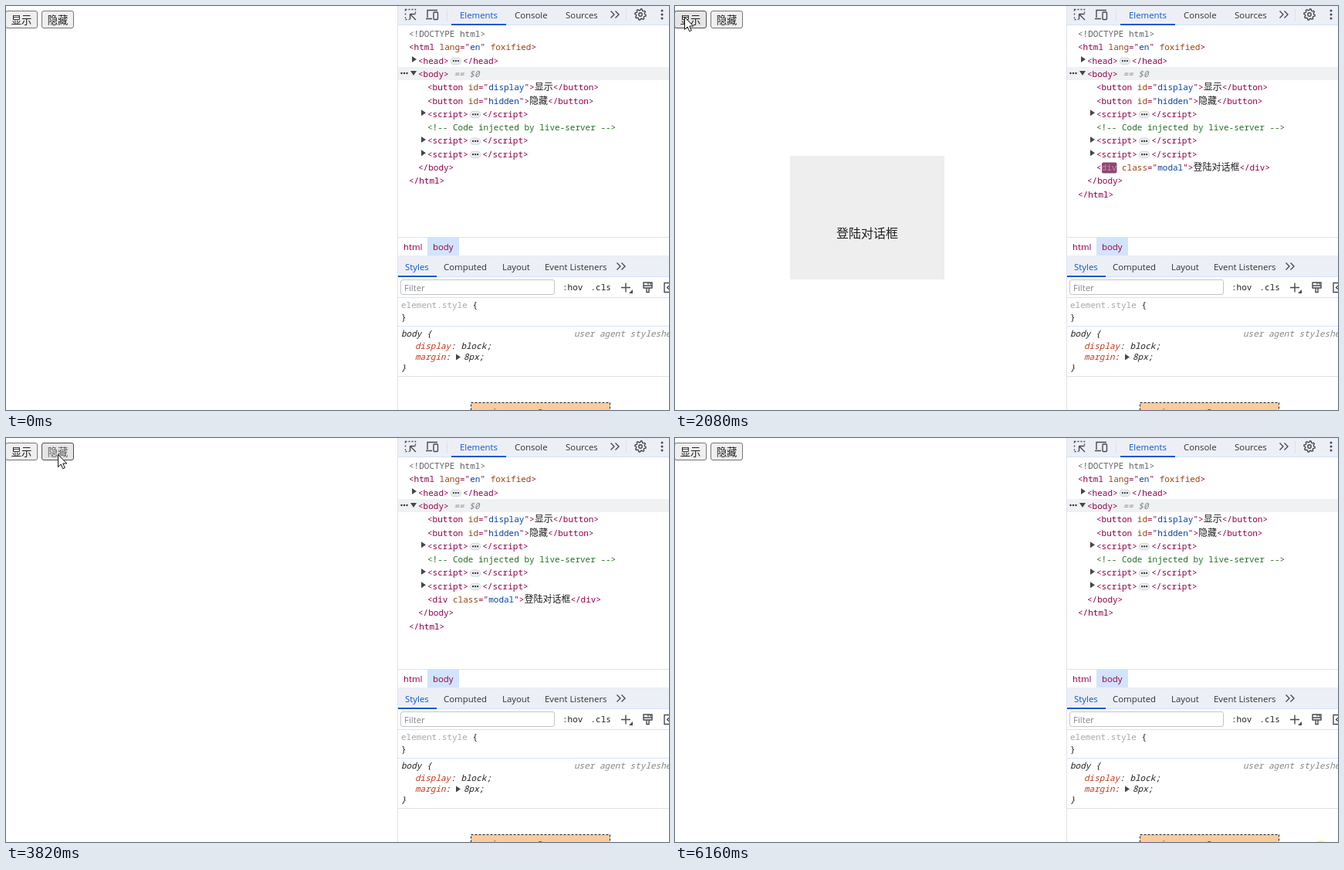
These frames come from a looping animation (859 px wide and 523 px high, 6.3 s). An HTML page:

```html
<!DOCTYPE html>
<html lang="zh">
<head>
<meta charset="utf-8">
<style>
  html, body { margin: 0; width: 100%; height: 100%; overflow: hidden; background: #fff; }
  svg { display: block; }
  text { white-space: pre; }
  .ui { font: 11.4px "Open Sans", sans-serif; fill: #303236; }
  .code { font: 11px "Noto Sans Mono", monospace; fill: #1f1f1f; }
  .cjk { font-family: "Noto Sans CJK SC", "Noto Sans CJK", sans-serif; fill: #1f1f1f; }
  .code .cjk { font-size: 12px; }
  .it { font-style: italic; }
  .tag { fill: #8e004b; }
  .attr { fill: #994510; }
  .val { fill: #0842a0; }
  .doc { fill: #5f6368; }
  .com { fill: #236e25; }
  .dim { fill: #80868b; }
  .prop { fill: #c03a1c; }
  .on { fill: #0b57d0; }
  .icon { fill: none; stroke: #474a50; stroke-width: 1.4; }
</style>
</head>
<body>
<svg id="stage" width="859" height="523" viewBox="0 0 859 523"></svg>
<script>
const LOOP = 6300;
const ROW = 17.3;
const stage = document.getElementById("stage");

const rect = (x, y, w, h, fill, extra = "") =>
  `<rect x="${x}" y="${y}" width="${w}" height="${h}" fill="${fill}" ${extra}/>`;
const text = (x, y, cls, body, extra = "") => `<text x="${x}" y="${y}" class="${cls}" ${extra}>${body}</text>`;
const path = (d, cls = "icon", extra = "") => `<path d="${d}" class="${cls}" ${extra}/>`;
const span = (cls, body) => `<tspan class="${cls}">${body}</tspan>`;
const rowY = i => +(40 + ROW * i).toFixed(1);

// Markup pieces of the element tree
const attr = (name, value) =>
  ` ${span("attr", name)}=&quot;${span("val", value)}&quot;`;
const open = (name, attrs = "") => span("tag", `&lt;${name}${attrs}&gt;`);
const close = name => span("tag", `&lt;/${name}&gt;`);
const row = (i, x, body, cls = "") => text(x, rowY(i), "code " + cls, body);
const rightArrow = (x, y) => path(`M${x} ${y - 4}l6 4-6 4z`, "", 'fill="#474747"');
const downArrow = (x, y) => path(`M${x} ${y - 3}h8l-4 6z`, "", 'fill="#474747"');

function folded(i, x, name) {
  const end = x + (name.length + 2) * 6.6;
  const mid = rowY(i) - 3.5;
  const dots = [-3, 0, 3].map(d => `<circle cx="${end + 9.3 + d}" cy="${mid}" r="1.1" fill="#303236"/>`).join("");
  return rightArrow(x - 8, mid - 2) + row(i, x, open(name)) +
    rect(end + 2.5, mid - 4, 13.5, 8.5, "#e9ebef", 'rx="4.2" stroke="#c7cad0" stroke-width=".7"') +
    dots + row(i, end + 18.4, close(name));
}

function button(id, x, label) {
  return `<g id="${id}">` + rect(x, 6.5, 41, 22, "#efefef", 'rx="2.5" stroke="#767676"') +
    text(x + 7.2, 23, "cjk", label, 'font-size="13.33"') + "</g>";
}

function tree() {
  return rect(508, 79, 351, 17, "#f0f1f3") +
    row(0, 522, "&lt;!DOCTYPE html&gt;", "doc") +
    row(1, 522, open("html", attr("lang", "en") + span("attr", " foxified"))) +
    folded(2, 534, "head") +
    [512.5, 516, 519.5].map(x => `<circle cx="${x}" cy="87" r="1.2" fill="#303236"/>`).join("") +
    downArrow(524, 87) +
    row(3, 534, open("body")) + row(3, 580.5, "== $0", "it dim") +
    row(4, 546, open("button", attr("id", "display")) + span("cjk", "显示") + close("button")) +
    row(5, 546, open("button", attr("id", "hidden")) + span("cjk", "隐藏") + close("button")) +
    folded(6, 546, "script") +
    row(7, 546, "&lt;!-- Code injected by live-server --&gt;", "com") +
    folded(8, 546, "script") + folded(9, 546, "script") +
    `<g id="divRow">${row(10, 546, open("div", attr("class", "modal")) + span("cjk", "登陆对话框") + close("div"))}</g>` +
    `<g id="tail">${row(10, 534, close("body")) + row(11, 522, close("html"))}</g>` +
    flash("divFlash", 553, 10, "div") + flash("bodyFlash", 541, 3, "body");
}

function flash(id, x, i, word) {
  return `<g id="${id}">` + rect(x, rowY(i) - 10.5, word.length * 6.6 - .4, 14, "#8e4472", 'rx="2"') +
    row(i, x - .4, word) + "</g>";
}

function toolbar() {
  const bar = "#edeff7";
  const line = "#d3e3fd";
  return rect(508, 0, 351, 24, bar) + rect(508, 24, 351, 1, line) +
    path("M517.5 16v-1.500m0-3v-2m0-3v-2h2m2 0h2m2 0h2m2 0h1v1m0 2v2M517.500 17.500h2m2 0h1") +
    path("M523.500 10.500v7m0-7h7m-7 0l7.500 7.500") +
    path("M546 15V5.500h13M544 16.500h8") +
    rect(554, 8, 5.5, 9.5, "none", 'class="icon" rx="1"') +
    rect(571, 4, 1, 16, line) + rect(803, 4, 1, 16, line) +
    text(588, 16, "ui on", "Elements") + rect(577, 23, 71, 2, "#0b57d0") +
    text(659, 16, "ui", "Console") + text(725, 16, "ui", "Sources") +
    chevrons(783.5, 11) + gear(822, 11) +
    [6, 11, 16].map(y => `<circle cx="850" cy="${y}" r="1.5" fill="#474a50"/>`).join("") +
    rect(508, 299, 351, 1, "#dfe2e8") + rect(546, 300, 41, 23, line) +
    text(515, 316, "ui tag", "html") + text(553, 316, "ui tag", "body") +
    rect(508, 323, 351, 27, bar) + rect(508, 350, 351, 1, line) +
    text(517, 342, "ui on", "Styles") + rect(508, 349, 50, 2, "#0b57d0") +
    text(567, 342, "ui", "Computed") + text(643, 342, "ui", "Layout") +
    text(698, 342, "ui", "Event Listeners") + chevrons(791.5, 337);
}

const chevrons = (x, y) => path(`M${x} ${y - 4.5}l4.500 4.500-4.500 4.500m6-9l4.500 4.500-4.500 4.500`);

function gear(cx, cy) {
  const points = [];
  for (let i = 0; i < 32; i++) {
    const r = i % 4 < 2 ? 7.2 : 5.5;
    const a = (i + .5) * Math.PI / 16;
    points.push(`${(cx + r * Math.cos(a)).toFixed(1)},${(cy + r * Math.sin(a)).toFixed(1)}`);
  }
  return `<polygon points="${points.join(" ")}" class="icon"/><circle cx="${cx}" cy="${cy}" r="2.2" class="icon"/>`;
}

function styles() {
  return rect(511.5, 354.5, 199, 19, "#fff", 'rx="2.5" stroke="#c2c5cb"') +
    text(516, 369, "ui dim", "Filter") +
    text(721, 368, "code", ":hov", 'font-weight="600"') + text(757.5, 368, "code", ".cls", 'font-weight="600"') +
    path("M797 364.500h12m-6-6v12") + path("M812 367v5h-5z", "", 'fill="#474a50"') +
    path("M826 358h11v7h-11zm0 4h11m-7 3v5.500h3V365m-1-7v2.500m3-2.500v2.500") +
    path("M860 358.500h-7v12h7m0-9l-3.500 3 3.500 3") +
    rect(508, 377, 351, 1, "#dfe2e8") +
    text(512, 391, "code", `<tspan fill="#a5a8ad">element.style</tspan> {`) + text(512, 407, "code", "}") +
    rect(508, 414, 351, 1, "#d3e3fd") +
    text(512, 428, "code it", "body {") + text(736, 428, "code it dim", "user agent stylesheet") +
    text(530, 444, "code it", span("prop", "display") + ": block;") +
    text(530, 458, "code it", span("prop", "margin") + ":") + rightArrow(583, 454.5) +
    text(593, 458, "code it", "8px;") + text(512, 472, "code it", "}") +
    rect(508, 479, 351, 1, "#dfe2e8") +
    rect(602.5, 513.5, 180, 40, "#f9cc9d", 'stroke="#202020" stroke-dasharray="3 2"') +
    text(604, 529, "ui", "margin") + text(689, 530, "ui", "8");
}

stage.innerHTML =
  button("show", -.5, "显示") + button("hide", 46.5, "隐藏") +
  `<g id="modal">${rect(149, 194, 200, 160, "#eee") + text(209, 299.5, "cjk", "登陆对话框", 'font-size="16"')}</g>` +
  rect(507, 0, 1, 523, "#dfe2e8") + toolbar() + tree() + styles() +
  `<ellipse id="glow" cx="837" cy="524" rx="6.500" ry="3" fill="#ffff58"/>` +
  path("M.5.5v16l3.700-3.500 2.500 5.700 2.600-1.100-2.500-5.600h5z", "", 'id="cursor" fill="#fff" stroke="#111"');

const el = id => document.getElementById(id);
const toggle = (id, visible) => el(id).setAttribute("visibility", visible ? "visible" : "hidden");
const within = (t, from, to) => t >= from && t < to;
const clamp = v => Math.max(0, Math.min(1, v));
const mix = (a, b, k) => a + (b - a) * k;
const blend = (a, b, k) => `rgb(${a.map((v, i) => Math.round(mix(v, b[i], k)))})`;

// Pointer stops: time, x, y
const stops = [
  [260, 444, 428], [860, 12, 37], [940, 12, 37], [1140, 12, 14],
  [2740, 12, 14], [3360, 59, 22], [3420, 59, 22], [3680, 67, 21],
  [4360, 67, 21], [4820, 188, 91], [4960, 275, 287], [5020, 310, 315], [5560, 842, 523]
];

function pointer(t) {
  const i = stops.findIndex(s => s[0] > t);
  if (i < 1) return null;
  const [t0, x0, y0] = stops[i - 1];
  const [t1, x1, y1] = stops[i];
  const k = Math.floor((t - t0) / 60) * 60 / (t1 - t0);
  return [Math.round(mix(x0, x1, k)), Math.round(mix(y0, y1, k))];
}

function paintButton(id, x, tip, pressed) {
  const hover = tip && within(tip[0], x, x + 42) && within(tip[1], 6, 29);
  const [box, label] = el(id).children;
  box.setAttribute("fill", hover ? "#e5e5e5" : "#efefef");
  box.setAttribute("stroke", hover ? "#4f4f4f" : "#767676");
  label.style.fill = pressed ? "#5c5c5c" : "#1f1f1f";
}

function paintFlash(id, age) {
  const [box, label] = el(id).children;
  const k = clamp(age / 900);
  toggle(id, age >= 0 && age < 1250);
  el(id).setAttribute("opacity", 1 - clamp((age - 950) / 300));
  box.setAttribute("fill", blend([142, 63, 112], [138, 136, 137], k));
  label.style.fill = blend([205, 150, 184], [92, 82, 84], k);
}

function draw(t) {
  const tip = pointer(t);
  toggle("cursor", tip);
  if (tip) el("cursor").setAttribute("transform", `translate(${tip})`);
  paintButton("show", 0, tip, within(t, 1780, 1900));
  paintButton("hide", 46, tip, within(t, 3820, 3960));
  const listed = within(t, 2000, 3940);
  toggle("modal", within(t, 1960, 3820));
  toggle("divRow", listed);
  el("tail").setAttribute("transform", `translate(0 ${listed ? ROW : 0})`);
  paintFlash("divFlash", t - 2000);
  paintFlash("bodyFlash", t - 3940);
  toggle("glow", t >= 6160);
}

const start = performance.now();
function frame() {
  draw((performance.now() - start) % LOOP);
  requestAnimationFrame(frame);
}
frame();
</script>
</body>
</html>
```
